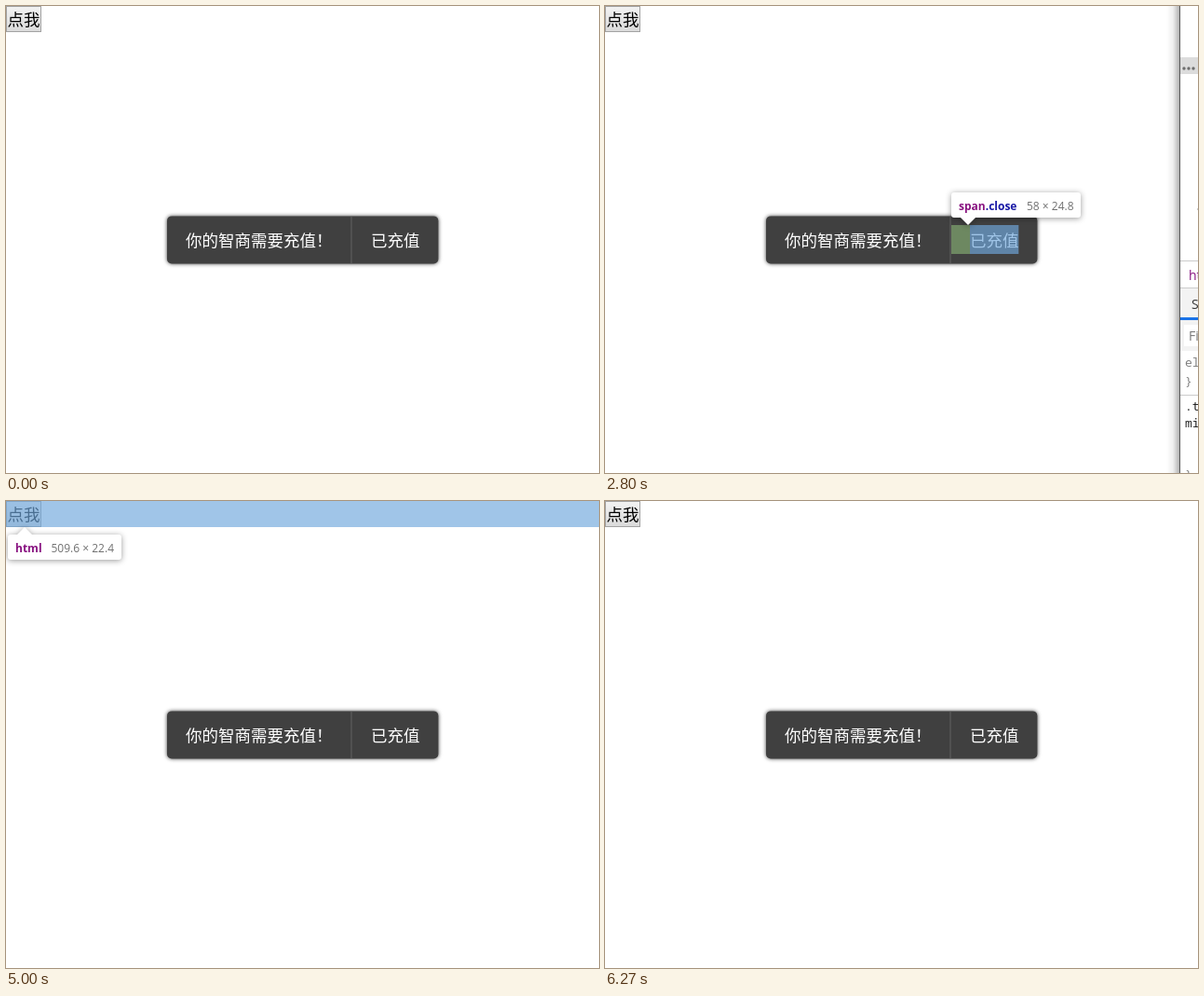
An HTML page for the animation above (8000 ms loop, 637x501 px).

```html
<!DOCTYPE html>
<html lang="zh-CN">
<head>
<meta charset="utf-8">
<title>Toast</title>
<style>
html, body { margin: 0; width: 100%; height: 100%; overflow: hidden; background: #fff; }
svg { display: block; width: 637px; height: 501px; }
.cn { font: 17.5px "Noto Sans CJK SC", "Noto Sans CJK", sans-serif; }
.tip { font: 12px "Open Sans", "Noto Sans", sans-serif; fill: #707070; }
.tip .box { fill: #fff; filter: drop-shadow(0 1px 3px rgba(0, 0, 0, .4)); }
.tag { font-weight: 700; fill: #881280; }
.cls { font-weight: 700; fill: #1a1aa6; }
.content { fill: rgba(111, 168, 220, .66); }
.pad { fill: rgba(147, 196, 125, .55); }
.sans { font: 14px "Open Sans", sans-serif; }
.mono { font: 13px "Noto Sans Mono", monospace; }
.code { font: 2.9px "Noto Sans Mono", monospace; white-space: pre; }

.anim { animation: 8s step-end infinite; opacity: 0; }
#thumb { animation-name: thumb; }
#shade { animation-name: shade; }
#panel { animation-name: panel; }
#trace { animation-name: trace; }
#cursor { animation-name: cursor; }
#spanMark { animation-name: spanMark; }
#htmlMark { animation-name: htmlMark; }
#toastMark { animation-name: toastMark; }

@keyframes thumb {
  0% { opacity: 0; transform: none; }
  14.125% { opacity: .35; transform: translateY(12px); }
  15% { opacity: .75; transform: translateY(4px); }
  15.875% { opacity: 1; transform: none; }
  25% { opacity: .5; transform: none; }
  25.875%, 100% { opacity: 0; transform: none; }
}
@keyframes shade {
  0% { opacity: .3; }
  23.375%, 100% { opacity: 0; }
}
@keyframes panel {
  0% { opacity: 0; transform: none; }
  25% { opacity: .35; transform: translateX(6px); }
  25.875% { opacity: .8; transform: translateX(2px); }
  27.5% { opacity: 1; transform: none; }
  47.5% { opacity: .6; transform: translateX(4px); }
  48.375% { opacity: .25; transform: translateX(9px); }
  49.125%, 100% { opacity: 0; transform: none; }
}
@keyframes trace {
  0% { opacity: 0; }
  49.125% { opacity: 1; }
  62.5%, 100% { opacity: 0; }
}
@keyframes cursor {
  0% { opacity: 0; }
  30.875% { opacity: 1; }
  31.625%, 100% { opacity: 0; }
}
@keyframes spanMark {
  0% { opacity: 0; }
  35% { opacity: 1; }
  38.375%, 100% { opacity: 0; }
}
@keyframes htmlMark {
  0% { opacity: 0; }
  62.5% { opacity: 1; }
  63.375%, 100% { opacity: 0; }
}
@keyframes toastMark {
  0% { opacity: 0; }
  63.375% { opacity: 1; }
  65.875% { opacity: 0; }
  69.125% { opacity: 1; }
  78.375%, 100% { opacity: 0; }
}
</style>
</head>
<body>
<svg viewBox="0 0 637 501" xmlns="http://www.w3.org/2000/svg">
  <defs>
    <linearGradient id="btn" x2="0" y2="1">
      <stop stop-color="#f3f3f3"/><stop offset="1" stop-color="#dadada"/>
    </linearGradient>
    <linearGradient id="head" x2="0" y2="1">
      <stop stop-color="#686a6a"/><stop offset="1" stop-color="#5c5e5e"/>
    </linearGradient>
    <linearGradient id="edge">
      <stop stop-color="#000" stop-opacity="0"/>
      <stop offset=".5" stop-color="#000" stop-opacity=".06"/>
      <stop offset="1" stop-color="#000" stop-opacity=".3"/>
    </linearGradient>
    <clipPath id="preview"><rect x="259" y="452" width="103" height="49"/></clipPath>
  </defs>

  <!-- page -->
  <g class="cn">
    <rect x=".5" y=".5" width="37" height="27" fill="url(#btn)" stroke="#a2a2a2"/>
    <text x="1.6" y="21.4">点我</text>
    <rect x="173" y="225.4" width="291.4" height="51" rx="5" fill="#404040"
      style="filter:drop-shadow(0 0 2px rgba(0,0,0,.75))"/>
    <path d="M371 226V276" stroke="#5c5c5c" stroke-width="1.25"/>
    <g fill="#fff">
      <text x="193" y="258">你的智商需要充值！</text>
      <text x="392" y="258">已充值</text>
    </g>
  </g>

  <!-- inspector highlights -->
  <g id="spanMark" class="anim tip">
    <rect class="pad" x="372" y="235" width="20" height="31"/>
    <rect class="content" x="392" y="235" width="52.3" height="31"/>
    <path class="box" d="M375 200H508a3 3 0 0 1 3 3V224a3 3 0 0 1-3 3H398L390 235L382 227H375a3 3 0 0 1-3-3V203a3 3 0 0 1 3-3Z"/>
    <text x="380" y="219"><tspan class="tag">span</tspan><tspan class="cls">.close</tspan></text>
    <text x="453" y="219">58 × 24.8</text>
  </g>
  <g id="htmlMark" class="anim tip">
    <rect class="content" width="637" height="28"/>
    <path class="box" d="M5 36H12L20 28L28 36H121a3 3 0 0 1 3 3V60a3 3 0 0 1-3 3H5a3 3 0 0 1-3-3V39a3 3 0 0 1 3-3Z"/>
    <text class="tag" x="10" y="55">html</text>
    <text x="48.5" y="55">509.6 × 22.4</text>
  </g>
  <g id="toastMark" class="anim tip">
    <path class="pad" d="M193 225.4H178a5 5 0 0 0-5 5V271.4a5 5 0 0 0 5 5H193ZM444 225.4H459.4a5 5 0 0 1 5 5V271.4a5 5 0 0 1-5 5H444Z"/>
    <rect class="content" x="193" y="225.4" width="251" height="51"/>
    <path class="box" d="M176 190H408a3 3 0 0 1 3 3V214a3 3 0 0 1-3 3H198.500L190.500 225L182.500 217H176a3 3 0 0 1-3-3V193a3 3 0 0 1 3-3Z"/>
    <text x="181" y="209" style="font-size:12.2px"><tspan class="tag">div</tspan><tspan class="cls">.toast.position-middle</tspan></text>
    <text x="345" y="209">233 × 40.8</text>
  </g>

  <!-- side panel -->
  <g id="panel" class="anim">
    <rect x="603" width="14" height="501" fill="url(#edge)"/>
    <rect x="617" width="30" height="501" fill="#fff"/>
    <rect x="618" y="55" width="29" height="18" fill="#dcdcdc"/>
    <g fill="#6e6e6e">
      <circle cx="622" cy="67" r="1.7"/><circle cx="627" cy="67" r="1.7"/><circle cx="632" cy="67" r="1.7"/>
    </g>
    <rect x="636" y="217" width="1" height="2" fill="#ccc"/>
    <rect x="618" y="303" width="29" height="67" fill="#f3f3f3"/>
    <path d="M618 273.500H647M618 302.500H647M618 417.500H647" stroke="#ccc"/>
    <rect x="618" y="334" width="29" height="3" fill="#1a73e8"/>
    <rect x="622" y="342" width="25" height="23" fill="#fff"/>
    <g class="sans">
      <text x="627" y="294" fill="#881280">ht</text>
      <text x="630" y="325" fill="#333">S</text>
      <text x="627" y="359" fill="#777">Fi</text>
    </g>
    <g class="mono" fill="#808080">
      <text x="623" y="387">el</text>
      <text x="623" y="407">}</text>
      <g fill="#222">
        <text x="623" y="434">.t</text>
        <text x="623" y="452">mi</text>
      </g>
      <text x="623" y="507">}</text>
    </g>
    <rect x="617" width="1" height="501" fill="#5a5a5a"/>
  </g>
  <rect id="trace" class="anim" x="630" width="7" height="501" fill="#fafafa"/>

  <!-- task thumbnail -->
  <g id="thumb" class="anim">
    <rect x="251" y="420" width="119" height="100" fill="url(#head)"
      style="filter:drop-shadow(1px 0 5px rgba(0,0,0,.5))"/>
    <rect id="shade" class="anim" x="251" y="420" width="119" height="100"/>
    <circle cx="267" cy="436" r="7.5" fill="#dd4b3e"/>
    <text x="283" y="441" fill="#fff" style="font:12px 'Open Sans',sans-serif">KitPa...</text>
    <path d="M348 430L360 442M360 430L348 442" stroke="#fff" stroke-width="1.5"/>
    <g clip-path="url(#preview)">
      <rect x="259" y="452" width="103" height="49" fill="#fff"/>
      <rect x="259" y="452" width="103" height="4" fill="#2b2e3b"/>
      <rect x="259" y="456" width="103" height="5" fill="#f1f1f1"/>
      <rect x="259" y="483" width="103" height="4" fill="#dcdcdc"/>
      <g class="code">
        <text x="262" y="455" fill="#ccc">■ Page tools</text>
        <text x="261" y="459.500" fill="#555">□ ▫  Elements  Console  Sources  Network  Memory</text>
        <g fill="#881280">
          <text x="262" y="465">&lt;!doctype html&gt;</text>
          <text x="262" y="468.500">&lt;html lang="en"&gt;</text>
          <text x="264" y="472">&lt;head&gt;…&lt;/head&gt;</text>
          <text x="264" y="479">&lt;body&gt;</text>
          <text x="266" y="482.500">&lt;button id="btn"&gt;点我&lt;/button&gt;</text>
          <text x="266" y="489.500">&lt;span class="text"&gt;…&lt;/span&gt;</text>
          <text x="266" y="493">&lt;span class="close"&gt;…&lt;/span&gt;</text>
          <text x="264" y="500">&lt;/body&gt;</text>
        </g>
        <g fill="#1a1aa6">
          <text x="264" y="475.500">&lt;style type="text/css"&gt;.toast { position: fixed; }&lt;/style&gt;</text>
          <text x="263" y="486">&lt;div class="toast position-middle"&gt; == $0</text>
          <text x="268" y="496.500">&lt;script src="toast.js"&gt;&lt;/script&gt;</text>
        </g>
      </g>
    </g>
  </g>

  <path id="cursor" class="anim" d="M434.500 316.500V332.500L438.200 329L440.800 334.500L443.200 333.500L440.700 328.200H445.500Z"
    fill="#fff" stroke="#000"/>
</svg>
</body>
</html>
```
